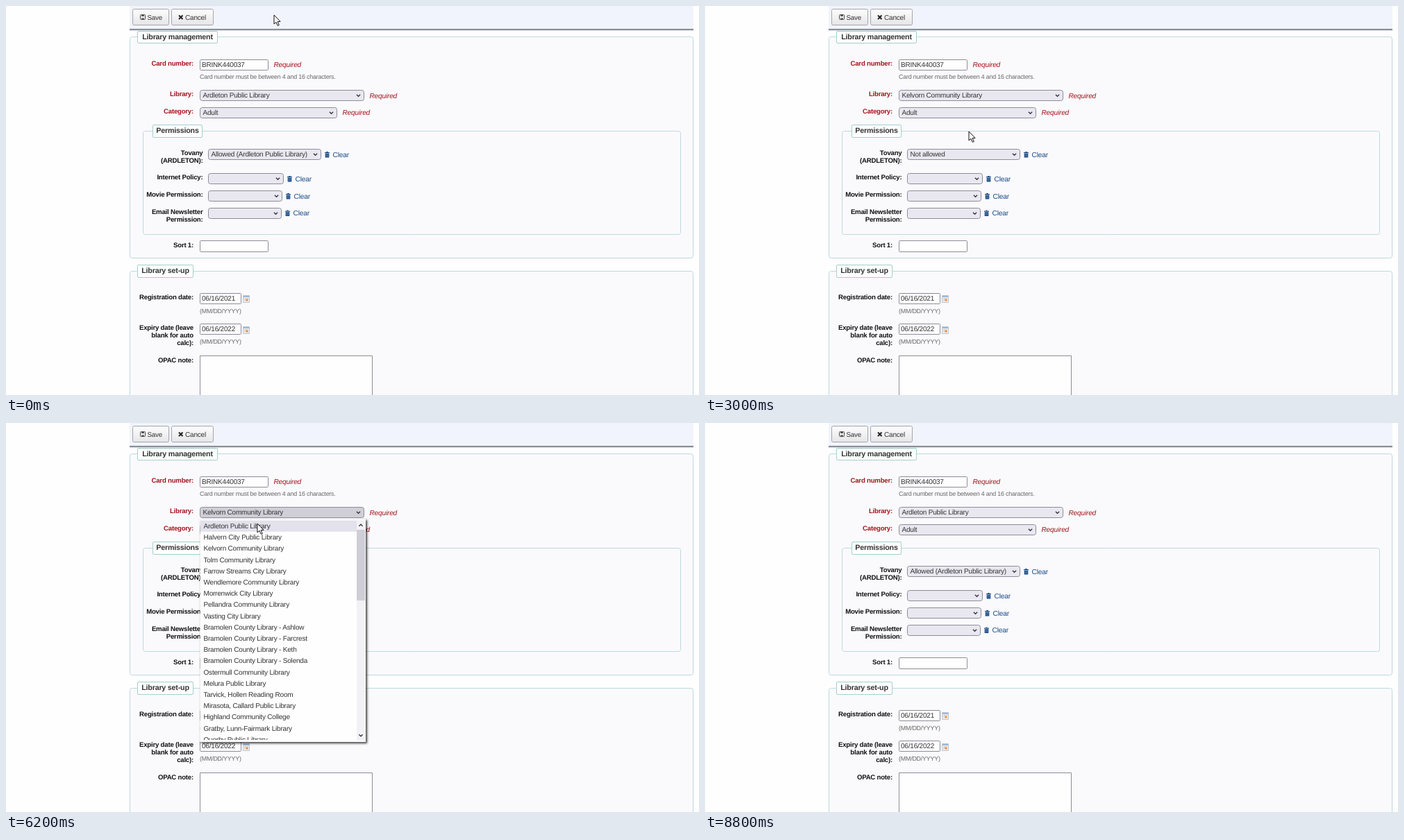
Animation, 998 px wide and 561 px high, one loop 9 s. Source, as an HTML page with a canvas:

```html
<!DOCTYPE html>
<html lang="en">
<head>
<meta charset="utf-8">
<title>Library form</title>
<style>
html, body { margin: 0; width: 100%; height: 100%; overflow: hidden; background: #fefefe; }
canvas { display: block; }
</style>
</head>
<body>
<canvas id="stage" width="998" height="561"></canvas>
<script>
const ctx = document.getElementById('stage').getContext('2d');
ctx.textRendering = 'geometricPrecision';
ctx.letterSpacing = '-0.2px';
const LOOP = 9000, STEP = 200;
const FAMILY = '"Liberation Sans", Arial, sans-serif';
const RED = '#a3151c', BLUE = '#1b4b85', EDGE = '#8d8c98';

const HOME = 'Ardleton Public Library', OTHER = 'Kelvorn Community Library';
const LIBRARIES = [
  HOME, 'Halvern City Public Library', OTHER, 'Tolm Community Library',
  'Farrow Streams City Library', 'Wendlemore Community Library', 'Morrenwick City Library',
  'Pellandra Community Library', 'Vasting City Library', 'Bramolen County Library - Ashlow',
  'Bramolen County Library - Farcrest', 'Bramolen County Library - Keth',
  'Bramolen County Library - Solenda', 'Ostermull Community Library', 'Melura Public Library',
  'Tarvick, Hollen Reading Room', 'Mirasota, Callard Public Library',
  'Highland Community College', 'Gratby, Lunn-Fairmark Library', 'Quorby Public Library'
];

// Pointer keys: time, x, y
const PATH = [
  [0, 386, 13], [200, 386, 24], [400, 387, 66], [600, 388, 110], [800, 388, 126],
  [1200, 388, 126], [1400, 388, 138], [1600, 388, 150], [2000, 388, 150],
  [2200, 387, 162], [2400, 384, 178], [2600, 381, 181], [3000, 380, 181],
  [3400, 358, 206], [3800, 343, 214], [4200, 336, 194], [4600, 332, 133],
  [5000, 334, 130], [5400, 346, 165], [5600, 352, 172], [6000, 361, 152],
  [6200, 362, 145], [6600, 363, 148], [7200, 368, 188], [7800, 371, 216],
  [8000, 371, 216], [8200, 369, 236], [8400, 365, 330], [8600, 360, 470], [8800, 356, 580]
];

function pointer(t) {
  const i = PATH.findIndex(k => k[0] > t);
  if (i < 0) return PATH[PATH.length - 1].slice(1);
  const [t0, x0, y0] = PATH[i - 1], [t1, x1, y1] = PATH[i];
  const p = (t - t0) / (t1 - t0);
  return [x0 + (x1 - x0) * p, y0 + (y1 - y0) * p];
}

const within = (t, a, b) => t >= a && t < b;

function text(s, x, y, size = 10, color = '#333', style = '', align = 'left') {
  ctx.font = `${style} ${size}px ${FAMILY}`;
  ctx.fillStyle = color;
  ctx.textAlign = align;
  ctx.fillText(s, x, y);
}

function rect(x, y, w, h, color) {
  ctx.fillStyle = color;
  ctx.fillRect(x, y, w, h);
}

// Outlined box from its outer edges
function box(l, t, r, b, fill, stroke, radius = 0) {
  ctx.beginPath();
  ctx.roundRect(l + .5, t + .5, r - l - 1, b - t - 1, radius);
  ctx.fillStyle = fill;
  ctx.fill();
  ctx.strokeStyle = stroke;
  ctx.lineWidth = 1;
  ctx.stroke();
}

function shape(points, fill) {
  ctx.beginPath();
  points.forEach(([x, y]) => ctx.lineTo(x, y));
  ctx.closePath();
  ctx.fillStyle = fill;
  ctx.fill();
}

const label = (s, x, y, color = '#111') => text(s, x, y, 9.6, color, 'bold', 'right');
const hint = (s, y) => text(s, 279, y, 8.9, '#666');
const required = (x, y) => text('Required', x, y, 10.15, RED, 'italic');
const fieldset = (l, t, r, b) => box(l, t, r, b, '#fafafd', '#bdd9dc', 3);

function legend(s, l, t, r, b) {
  box(l, t, r, b, '#fefefe', '#a4cfc9', 1.5);
  text(s, (l + r) / 2, t + 12.2, 10.7, '#333', 'bold', 'center');
}

function chevron(x, y, dir = 1) {
  ctx.beginPath();
  ctx.moveTo(x - 2.6, y - 1.3 * dir);
  ctx.lineTo(x, y + 1.3 * dir);
  ctx.lineTo(x + 2.6, y - 1.3 * dir);
  ctx.strokeStyle = '#33323a';
  ctx.lineWidth = 1.3;
  ctx.stroke();
}

function select(l, t, r, value = '', active = false) {
  box(l, t, r, t + 16, active ? '#d0cfd8' : '#e9e8f0', EDGE, 3);
  text(value, l + 4.5, t + 11.4);
  chevron(r - 8.5, t + 8);
}

function input(l, t, r, b, value = '') {
  box(l, t, r, b, '#fefefe', EDGE, 1);
  text(value, l + 3, t + 11.4);
}

function clearLink(x, y) {
  rect(x, y - 3, 7, 1.2, BLUE);
  rect(x + 2.2, y - 4, 2.6, 1, BLUE);
  rect(x + .7, y - 1.3, 5.6, 5.8, BLUE);
  rect(x + 2.3, y - .3, .6, 3.6, '#8fa9c6');
  rect(x + 4.1, y - .3, .6, 3.6, '#8fa9c6');
  text('Clear', x + 11.5, y + 3.7, 10.2, BLUE);
}

function calendar(y) {
  box(341, y, 351, y + 11, '#f1f1f2', '#b9c5d2');
  rect(342, y + 1, 8, 2, '#9eb9d6');
  rect(343, y + 4.5, 6, 1, '#e2a577');
  rect(345.5, y + 6, 3, 2.5, '#e6883f');
  rect(343, y + 6.5, 1.5, 2, '#cbd0d8');
}

function button(l, r) {
  const g = ctx.createLinearGradient(0, 4, 0, 28);
  g.addColorStop(0, '#fefefe');
  g.addColorStop(1, '#e5e5e8');
  box(l, 4, r, 28, g, '#a5a5aa', 2);
}

function toolbar() {
  rect(178, 0, 812, 33, '#f1f4fc');
  rect(178, 33, 812, 1.6, '#666b78');
  rect(178, 34.6, 812, 1.2, '#c9ccd3');
  button(182, 235);
  box(193, 12, 201, 20, '#fafafa', '#444', 1);
  rect(195, 12, 4, 3, '#555');
  rect(195, 17, 4, 2, '#777');
  text('Save', 203.5, 19.5, 9.8);
  button(238, 299);
  ctx.beginPath();
  ctx.moveTo(249, 13.5); ctx.lineTo(254.5, 19);
  ctx.moveTo(254.5, 13.5); ctx.lineTo(249, 19);
  ctx.strokeStyle = '#222';
  ctx.lineWidth = 2;
  ctx.stroke();
  text('Cancel', 258, 19.5, 10);
}

function form(s) {
  fieldset(178, 44, 990, 364);
  legend('Library management', 189, 36, 305, 54);
  label('Card number:', 270, 86, RED);
  input(279, 77, 378, 93, 'BRINK440037');
  required(385.5, 88);
  hint('Card number must be between 4 and 16 characters.', 105.3);
  label('Library:', 270, 130.3, RED);
  select(279, 121, 516, s.library, s.hoverLibrary);
  required(523.5, 132.5);
  label('Category:', 270, 155.3, RED);
  select(279, 146, 477, 'Adult');
  required(484.5, 157.3);

  fieldset(197, 180, 972, 330);
  legend('Permissions', 211, 171, 283, 190);
  label('Tovany', 283.5, 215.2);
  label('(ARDLETON):', 283.5, 226.2);
  select(291, 206, 454, s.allowed ? `Allowed (${HOME})` : 'Not allowed', s.hoverPermit);
  label('Internet Policy:', 283.5, 250.2);
  select(291, 241, 400);
  label('Movie Permission:', 283.5, 275.2);
  select(291, 266, 398);
  label('Email Newsletter', 283.5, 300.2);
  label('Permission:', 283.5, 311.2);
  select(291, 291, 397);
  clearLink(459, 214);
  clearLink(405, 249);
  clearLink(403, 274);
  clearLink(402, 298.5);
  label('Sort 1:', 270, 347.5);
  input(279, 338, 378, 355);

  fieldset(178, 382, 990, 580);
  legend('Library set-up', 189, 373, 270, 392);
  label('Registration date:', 270, 423.3);
  input(279, 414, 339, 430, '06/16/2021');
  calendar(417);
  hint('(MM/DD/YYYY)', 442.8);
  label('Expiry date (leave', 270, 467.3);
  label('blank for auto', 270, 478.3);
  label('calc):', 270, 489.3);
  input(279, 458, 339, 474, '06/16/2022');
  calendar(462);
  hint('(MM/DD/YYYY)', 487);
  label('OPAC note:', 270, 513.5);
  box(279, 504, 528, 580, '#fefefe', EDGE);
}

function dropdown(active) {
  ctx.save();
  ctx.shadowColor = 'rgba(0,0,0,.75)';
  ctx.shadowBlur = 3;
  ctx.shadowOffsetX = ctx.shadowOffsetY = 1.5;
  rect(279.5, 138.5, 238.5, 321.5, '#fefefe');
  ctx.restore();
  ctx.save();
  ctx.beginPath();
  ctx.rect(280, 139, 225, 318);
  ctx.clip();
  rect(280, 140.5 + active * 16.2, 225, 16.2, '#e3e1eb');
  LIBRARIES.forEach((name, i) => text(name, 284.5, 152 + i * 16.2));
  ctx.restore();
  rect(505, 140, 12, 318, '#f2f1f5');
  rect(505, 154, 12, 102, '#cfced6');
  chevron(511, 147.5, -1);
  chevron(511, 450.5);
}

function arrow(x, y) {
  const outline = [[0, 0], [0, 13], [3, 10.3], [5.3, 15.4], [7.3, 14.5], [5.1, 9.6], [9, 9.4]];
  shape(outline.map(([dx, dy]) => [x + dx, y + dy]), '#fff');
  ctx.strokeStyle = '#111';
  ctx.lineWidth = 1;
  ctx.stroke();
}

function draw(t) {
  const [x, y] = pointer(t);
  const open = within(t, 1200, 2600) || within(t, 5000, 6400);
  const changed = within(t, 2600, 6400);
  rect(0, 0, 998, 561, '#fefefe');
  toolbar();
  form({
    library: changed ? OTHER : HOME,
    allowed: !changed,
    hoverLibrary: open || within(t, 800, 1200) || within(t, 4800, 5000),
    hoverPermit: within(t, 3400, 4200) || within(t, 7600, 8400)
  });
  if (open) {
    const row = Math.floor((y - 140.5) / 16.2);
    dropdown(row < 0 ? (changed ? 2 : 0) : row);
  }
  if (t < 8800) arrow(x, y);
}

function tick(now) {
  draw(Math.floor((now % LOOP) / STEP) * STEP);
  requestAnimationFrame(tick);
}
draw(0);
requestAnimationFrame(tick);
</script>
</body>
</html>
```
